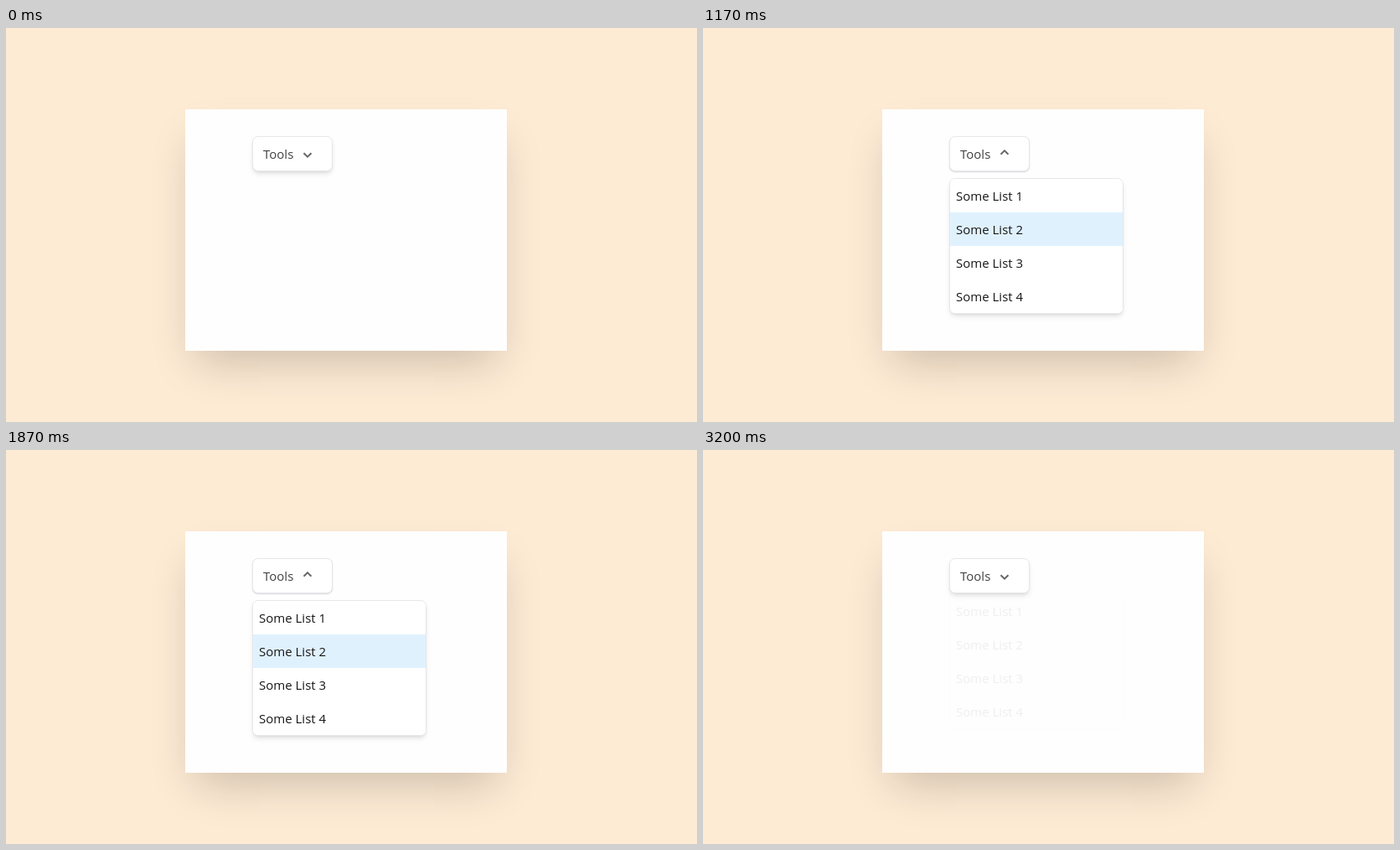
An HTML page for the animation above (3.31 s loop, 825x470 px).

```html
<!DOCTYPE html>
<html lang="en">
<head>
<meta charset="utf-8">
<title>Dropdown menu</title>
<style>
  :root { --loop: 3310ms; }
  * { box-sizing: border-box; }
  html, body { margin: 0; width: 100%; height: 100%; overflow: hidden; }
  body {
    position: relative;
    background: #feebd4;
    font: 15px/40px "Open Sans", "Noto Sans", sans-serif;
    color: #171717;
  }
  .card, .button, .menu, .chevron { position: absolute; }
  .card {
    left: 214px; top: 97px; width: 384px; height: 288px;
    background: #fefefe;
    box-shadow: 0 25px 50px -12px rgb(0 0 0 / .2);
  }
  .button, .menu {
    left: 80px;
    background: #fff;
    border: 1px solid #e5e7eb;
    border-radius: 7px;
    box-shadow: 0 4px 6px -1px rgb(0 0 0 / .1), 0 2px 4px -2px rgb(0 0 0 / .1);
  }
  .button {
    top: 32px; width: 96px; height: 42px;
    padding-left: 12px;
    color: #404040;
    animation: press var(--loop) linear infinite;
  }
  .chevron {
    left: 59px; top: 14.25px; width: 12px; height: 12px;
    fill: none; stroke: #666; stroke-width: 2;
    animation: flip var(--loop) linear infinite;
  }
  .menu {
    top: 82px; width: 208px; height: 162px;
    margin: 0; padding: 0;
    list-style: none;
    overflow: hidden;
    animation: drop var(--loop) linear infinite;
  }
  .menu li {
    height: 40px; padding-left: 7px;
    animation: var(--hover) var(--loop) step-end infinite;
  }
  .menu li:nth-child(1) { --hover: hover1; }
  .menu li:nth-child(2) { --hover: hover2; }
  .menu li:nth-child(3) { --hover: hover3; }
  .menu li:nth-child(4) { --hover: hover4; }

  @keyframes drop {
    0% { opacity: 0; transform: translateY(-8px); }
    19.49% { opacity: 0; transform: translateY(-8px); animation-timing-function: ease; }
    28.7%, 88.81% { opacity: 1; transform: none; }
    88.82% { opacity: .88; transform: translateY(-2px); animation-timing-function: ease-out; }
    96.67%, 100% { opacity: .06; transform: translateY(-8px); }
  }
  @keyframes flip {
    0% { transform: rotateX(0deg); }
    19.49% { transform: rotateX(0deg); animation-timing-function: ease; }
    28.7%, 88.81% { transform: rotateX(180deg); }
    88.82% { transform: rotateX(118deg); animation-timing-function: ease-out; }
    96.67%, 100% { transform: rotateX(0deg); }
  }
  @keyframes press {
    31.42%, 64.05% { box-shadow: 0 1px 2px 0 rgb(0 0 0 / .1), 0 1px 2px 0 rgb(0 0 0 / .06); }
    0%, 30%, 65.25%, 100% { box-shadow: 0 4px 6px -1px rgb(0 0 0 / .1), 0 2px 4px -2px rgb(0 0 0 / .1); }
  }
  @keyframes hover1 {
    0%, 35.34%, 64.05%, 100% { background: #fff; }
    31.42%, 60.42% { background: #e0f1fe; }
  }
  @keyframes hover2 {
    0%, 37.46%, 60.42%, 100% { background: #fff; }
    35.34%, 56.49% { background: #e0f1fe; }
  }
  @keyframes hover3 {
    0%, 41.38%, 56.49%, 100% { background: #fff; }
    37.46%, 52.86% { background: #e0f1fe; }
  }
  @keyframes hover4 {
    0%, 52.86%, 100% { background: #fff; }
    41.38% { background: #e0f1fe; }
  }
</style>
</head>
<body>
  <div class="card">
    <div class="button">
      Tools
      <svg class="chevron" viewBox="0 0 12 12"><path d="M1.5 5.3 6 9.7l4.5-4.4"/></svg>
    </div>
    <ul class="menu">
      <li>Some List 1</li>
      <li>Some List 2</li>
      <li>Some List 3</li>
      <li>Some List 4</li>
    </ul>
  </div>
</body>
</html>
```
